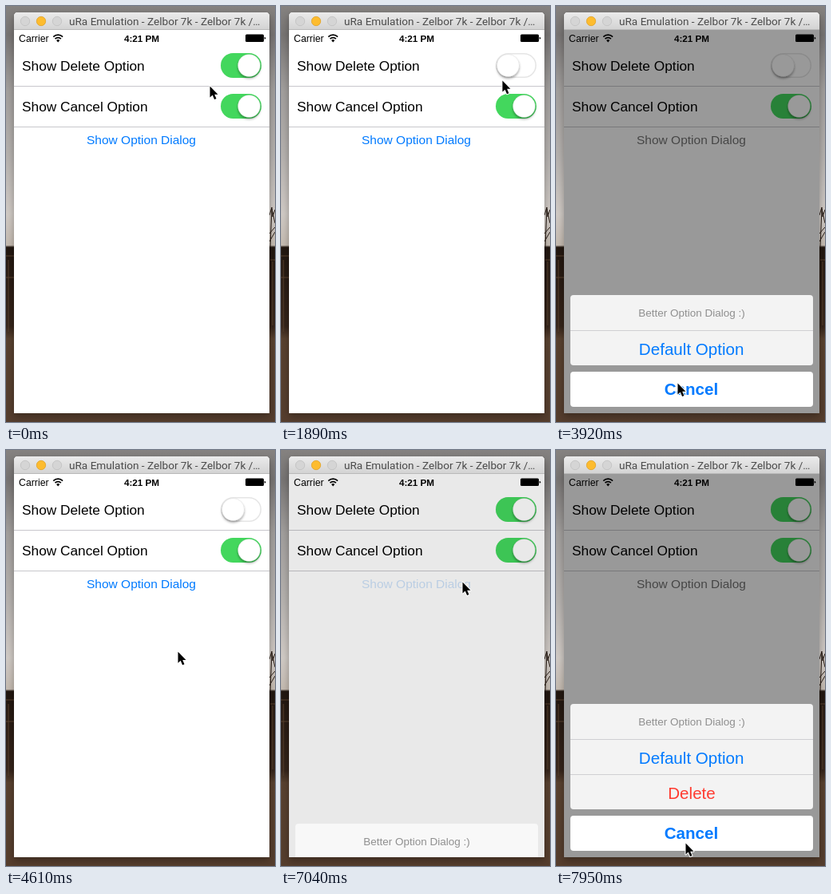
Write an HTML page that moves like this. It is 337 by 521 pixels and loops after 8000 ms.

```html
<!DOCTYPE html>
<html lang="en">
<head>
<meta charset="utf-8">
<title>Option dialog demo</title>
<style>
  html, body { margin: 0; width: 100%; height: 100%; overflow: hidden; }
  svg { display: block; width: 337px; height: 521px; }
  text { font-family: "Liberation Sans", Arial, sans-serif; white-space: pre; }
  .mid { text-anchor: middle; }
  .row { font-size: 17.3px; }
  .opt { font-size: 20.6px; fill: #007aff; }
  .knob { fill: #fff; stroke: #000; stroke-opacity: .07; filter: url(#soft); }
</style>
</head>
<body>
<svg viewBox="0 0 337 521">
  <defs>
    <linearGradient id="scene" x2="0" y2="1">
      <stop offset="0" stop-color="#858280"/>
      <stop offset=".07" stop-color="#777473"/>
      <stop offset=".2" stop-color="#a19e9c"/>
      <stop offset=".36" stop-color="#b5b1ae"/>
      <stop offset=".5" stop-color="#d0cac5"/>
      <stop offset=".575" stop-color="#c4bab0"/>
      <stop offset=".58" stop-color="#21160f"/>
      <stop offset=".77" stop-color="#35241a"/>
      <stop offset=".8" stop-color="#58412f"/>
      <stop offset="1" stop-color="#553d2d"/>
    </linearGradient>
    <linearGradient id="bar" x2="0" y2="1">
      <stop offset="0" stop-color="#ebebeb"/>
      <stop offset="1" stop-color="#d2d2d2"/>
    </linearGradient>
    <filter id="soft" x="-50%" y="-50%" width="200%" height="200%">
      <feDropShadow dx="0" dy="2.2" stdDeviation="1.6" flood-opacity=".36"/>
    </filter>
    <filter id="glow" x="-10%" y="-10%" width="120%" height="120%">
      <feDropShadow dx="0" dy="4" stdDeviation="5" flood-opacity=".3"/>
    </filter>
    <clipPath id="screen"><rect x="10" y="30" width="320" height="480"/></clipPath>
  </defs>

  <rect width="337" height="521" fill="url(#scene)"/>
  <path d="M330 262l3-10 1 12 3-9M331 302l2-48 4 18M330 285l7-8M330 295l7-12" fill="none" stroke="#2a1e17"/>
  <path d="M0 313h10M0 340h10M3 318v90M331 318h6M334 320v80" stroke="#59402e"/>

  <path d="M10 510V13q0-5 5-5H325q5 0 5 5V510z" fill="#fff" filter="url(#glow)"/>
  <path d="M10 30V13q0-5 5-5H325q5 0 5 5V30z" fill="url(#bar)"/>
  <path d="M10 29.5H330" stroke="#b9b9b9"/>
  <g stroke-width=".8">
    <circle cx="24" cy="19" r="5.7" fill="#d5d5d5" stroke="#c0c0c0"/>
    <circle cx="44" cy="19" r="5.7" fill="#fdbc2f" stroke="#e0a125"/>
    <circle cx="64" cy="19" r="5.7" fill="#d5d5d5" stroke="#c0c0c0"/>
  </g>
  <text x="79" y="24" font-size="13.6" fill="#4b4b4b" style="font-family:Roboto,sans-serif">uRa Emulation - Zelbor 7k - Zelbor 7k /…</text>

  <g clip-path="url(#screen)">
    <text x="16" y="45" font-size="12.3">Carrier</text>
    <path d="M59.3 38.6a8.4 8.4 0 0 1 11.8 0M61.5 41.1a5.2 5.2 0 0 1 7.4 0" fill="none" stroke="#000" stroke-width="1.7"/>
    <path d="M65.2 45.4l-2.1-2.3a3 3 0 0 1 4.2 0z"/>
    <text class="mid" x="170" y="45" font-size="11.7" font-weight="bold">4:21 PM</text>
    <rect x="300" y="35.5" width="23" height="9.5" rx="1.5"/>
    <path d="M323.7 38.7v3q1.5-.4 1.5-1.5t-1.5-1.5"/>

    <text class="row" x="20" y="81">Show Delete Option</text>
    <text class="row" x="20" y="132">Show Cancel Option</text>
    <path d="M10 100.5H330M10 151.5H330" stroke="#c8c7cc"/>
    <g transform="translate(269 59)">
      <rect x=".75" y=".75" width="49.5" height="29.5" rx="14.75" fill="#fff" stroke="#e5e5e5" stroke-width="1.5"/>
      <rect id="green" width="51" height="31" rx="15.5" fill="#43d75d"/>
      <rect id="knob" class="knob" y="1.5" height="28" rx="14"/>
    </g>
    <g transform="translate(269 110)">
      <rect width="51" height="31" rx="15.5" fill="#43d75d"/>
      <rect class="knob" x="21.5" y="1.5" width="28" height="28" rx="14"/>
    </g>
    <text id="link" class="mid" x="169.5" y="172.5" font-size="15.5">Show Option Dialog</text>

    <rect id="dim" x="10" y="30" width="320" height="480"/>
    <g id="sheet">
      <g id="upper">
        <rect id="panel" x="18" width="304" rx="4" fill="#f9f9f9" fill-opacity=".94"/>
        <path id="lines" stroke="#cfcfd2"/>
        <text class="mid" x="170" y="27" font-size="13.5" fill="#8f8f8f">Better Option Dialog :)</text>
        <text class="mid opt" x="169.7" y="74.5">Default Option</text>
        <text id="del" class="mid opt" x="170" y="118.5" style="fill:#ff3b30">Delete</text>
      </g>
      <rect x="18" y="458" width="304" height="44" rx="4" fill="#fff"/>
      <text class="mid opt" x="169.5" y="487" font-weight="bold">Cancel</text>
    </g>
  </g>

  <path id="cursor" d="M0 0V14L3.2 11.1 5.6 16.6 8 15.6 5.7 10.2H10z" stroke="#fff" stroke-width="2" paint-order="stroke" stroke-linejoin="round"/>
</svg>
<script>
const LOOP = 8000;
const $ = id => document.getElementById(id);
const set = (id, attrs) => { for (const k in attrs) $(id).setAttribute(k, attrs[k]); };
const clamp = v => Math.min(1, Math.max(0, v));
const smooth = v => { v = clamp(v); return v * v * (3 - 2 * v); };
const mix = (a, b, p) => a + (b - a) * p;

// Cursor way points: time, x, y
const path = [
  [0, 255, 100], [30, 255, 100], [700, 288, 71], [1600, 288, 71],
  [1890, 277, 93], [2190, 215, 159], [2370, 211, 164], [2930, 211, 164],
  [3340, 163, 435], [3750, 152, 472], [3950, 152, 472], [4200, 160, 437],
  [5060, 276, 91], [5230, 281, 91], [5850, 281, 91], [6220, 237, 155],
  [6400, 231, 161], [6630, 227, 165], [7610, 227, 165], [7950, 162, 492], [8000, 162, 492]
];

// Monotone cubic through the way points
function along(t, axis) {
  const slope = i => path[i + 1] ? (path[i + 1][axis] - path[i][axis]) / (path[i + 1][0] - path[i][0]) : 0;
  const tangent = i => {
    const a = i ? slope(i - 1) : 0, b = slope(i);
    return a * b > 0 ? 2 * a * b / (a + b) : 0;
  };
  let i = 0;
  while (i < path.length - 2 && t >= path[i + 1][0]) i++;
  const d = path[i + 1][0] - path[i][0], u = (t - path[i][0]) / d;
  return mix(path[i][axis], path[i + 1][axis], u * u * (3 - 2 * u))
    + d * u * (1 - u) * (tangent(i) * (1 - u) - tangent(i + 1) * u);
}

// Critically damped spring from 0 to 1
const spring = ms => {
  const s = Math.max(0, ms) * .025;
  return 1 - (1 + s) * Math.exp(-s);
};

function drawSwitch(t) {
  const start = t < 4000 ? 1400 : 5630, s = t - start;
  const moved = smooth((s - 140) / 280);
  const on = t < 4000 ? 1 - moved : moved;
  const width = 28 + 6 * (smooth(s / 120) - smooth((s - 220) / 200));
  set("green", { opacity: on });
  set("knob", { width, x: mix(1.5, 49.5 - width, on) });
}

function drawLink(t, shown) {
  const [down, up] = t < 5000 ? [2360, 2520] : [6860, 7020];
  const rgb = [0, 122, 255].map(c => Math.round(mix(c, 115, shown)));
  set("link", {
    fill: `rgb(${rgb})`,
    opacity: t < down ? 1 : mix(.2, 1, smooth((t - up) / 220))
  });
}

function drawSheet(t, shown) {
  const rows = t < 5000 ? 2 : 3, top = 450 - rows * 44, height = 510 - top;
  set("upper", { transform: `translate(0 ${top})` });
  set("panel", { height: rows * 44 });
  set("lines", { d: "M18 44.5H322" + (rows > 2 ? "M18 88.5H322" : "") });
  set("del", { visibility: rows > 2 ? "visible" : "hidden" });
  set("sheet", { transform: `translate(0 ${(1 - shown) * height})` });
  set("dim", { opacity: .4 * shown });
}

function draw(t) {
  const shown = t < 5000 ? spring(t - 2534) - spring(t - 3930) : spring(t - 7006);
  drawSwitch(t);
  drawLink(t, shown);
  drawSheet(t, shown);
  set("cursor", { transform: `translate(${along(t, 1) + .5} ${along(t, 2) + .5})` });
}

const begin = performance.now();
function tick() {
  draw((performance.now() - begin) % LOOP);
  requestAnimationFrame(tick);
}
tick();
</script>
</body>
</html>
```
